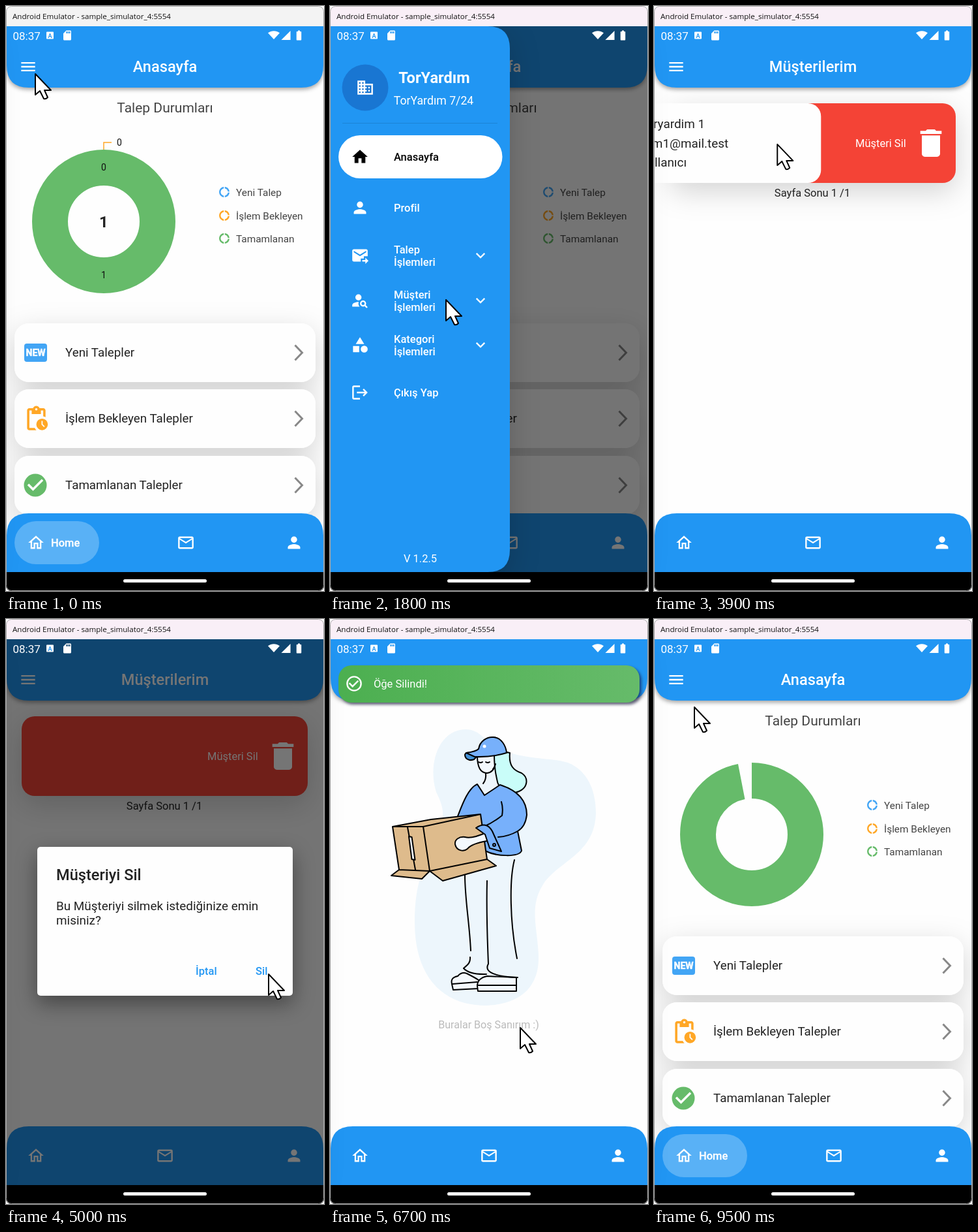
An HTML page for the animation above (9600 ms loop, 488 by 896 pixels).

```html
<!DOCTYPE html>
<html lang="tr">
<head>
<meta charset="utf-8">
<title>Emulator</title>
<style>
html, body { margin: 0; width: 100%; height: 100%; overflow: hidden; background: #fff; }
svg { display: block; font-family: Roboto, sans-serif; }
.soft { filter: drop-shadow(0 13px 22px rgba(0,0,0,.17)); }
.head { filter: drop-shadow(0 3px 3px rgba(0,0,0,.35)); }
.ink { stroke: #000; stroke-width: 2; stroke-linejoin: round; stroke-linecap: round; }
</style>
</head>
<body>
<svg id="stage" width="488" height="896" viewBox="0 0 488 896"></svg>
<script>
const BLUE = '#2196f3', GREEN = '#66bb6a', ORANGE = '#ffa726', SKY = '#42a5f5', DARK = '#222';
const CHECK = 'M16.59 7.58L10 14.17l-3.59-3.58L5 12l5 5 8-8zM12 2a10 10 0 1 0 0 20a10 10 0 0 0 0-20zm0 18a8 8 0 1 1 0-16a8 8 0 0 1 0 16z';
const ICONS = {
  menu: 'M3 18h18v-2H3v2zm0-5h18v-2H3v2zm0-7v2h18V6H3z',
  homeLine: 'M12 5.69l5 4.5V18h-2v-6H9v6H7v-7.81l5-4.5M12 3L2 12h3v8h6v-6h2v6h6v-8h3L12 3z',
  home: 'M10 20v-6h4v6h5v-8h3L12 3 2 12h3v8z',
  mail: 'M22 6c0-1.1-.9-2-2-2H4c-1.1 0-2 .9-2 2v12c0 1.1.9 2 2 2h16c1.1 0 2-.9 2-2V6zm-2 0l-8 5-8-5h16zm0 12H4V8l8 5 8-5v10z',
  send: 'M20 4H4c-1.1 0-2 .9-2 2v12c0 1.1.9 2 2 2h9v-4h4v-3h5V6c0-1.1-.9-2-2-2zm0 4l-8 5-8-5V6l8 5 8-5v2zM19 15l4 4-4 4v-3h-4v-2h4z',
  person: 'M12 12c2.21 0 4-1.79 4-4s-1.79-4-4-4-4 1.79-4 4 1.79 4 4 4zm0 2c-2.67 0-8 1.34-8 4v2h16v-2c0-2.66-5.33-4-8-4z',
  personLine: 'M12 5.9a2.1 2.1 0 1 1 0 4.2a2.1 2.1 0 0 1 0-4.2m0 9c2.97 0 6.1 1.46 6.1 2.1v1.1H5.9V17c0-.64 3.13-2.1 6.1-2.1M12 4a4 4 0 1 0 0 8a4 4 0 0 0 0-8zm0 9c-2.67 0-8 1.34-8 4v3h16v-3c0-2.66-5.33-4-8-4z',
  personSearch: 'M10 4a4 4 0 1 0 0 8a4 4 0 0 0 0-8zM10.35 14.01C7.62 13.91 2 15.27 2 18v2h9.54c-2.47-2.76-1.23-5.89-1.19-5.99zM19.43 18.02c.36-.59.57-1.28.57-2.02a4 4 0 1 0-4 4c.74 0 1.43-.22 2.02-.57L20.59 22 22 20.59zM16 18a2 2 0 1 1 0-4a2 2 0 0 1 0 4z',
  category: 'M12 2l-5.5 9h11zM17.5 13a4.5 4.5 0 1 0 0 9a4.5 4.5 0 0 0 0-9zM3 13.5h8v8H3z',
  logout: 'M17 7l-1.41 1.41L18.17 11H8v2h10.17l-2.58 2.58L17 17l5-5zM4 5h8V3H4c-1.1 0-2 .9-2 2v14c0 1.1.9 2 2 2h8v-2H4V5z',
  more: 'M16.59 8.59L12 13.17 7.41 8.59 6 10l6 6 6-6z',
  office: 'M12 7V3H2v18h20V7H12zM6 19H4v-2h2v2zm0-4H4v-2h2v2zm0-4H4V9h2v2zm0-4H4V5h2v2zm4 12H8v-2h2v2zm0-4H8v-2h2v2zm0-4H8V9h2v2zm0-4H8V5h2v2zm10 12h-8v-2h2v-2h-2v-2h2v-2h-2V9h8v10zm-2-8h-2v2h2v-2zm0 4h-2v2h2v-2z',
  pending: 'M17 12a5 5 0 1 0 0 10a5 5 0 0 0 0-10zm1.65 7.35L16.5 17.2V14h1v2.79l1.85 1.85-.7.71zM18 3h-3.18C14.4 1.84 13.3 1 12 1s-2.4.84-2.82 2H6c-1.1 0-2 .9-2 2v15c0 1.1.9 2 2 2h6.11c-.59-.57-1.07-1.25-1.42-2H6V5h2v3h8V5h2v5.08c.71.1 1.38.31 2 .6V5c0-1.1-.9-2-2-2zm-6 2a1 1 0 1 1 0-2a1 1 0 0 1 0 2z',
  done: 'M12 2a10 10 0 1 0 0 20a10 10 0 0 0 0-20zm-2 15l-5-5 1.41-1.41L10 14.17l7.59-7.59L19 8l-9 9z',
  check: CHECK,
  trash: 'M6 19c0 1.1.9 2 2 2h8c1.1 0 2-.9 2-2V7H6v12zM19 4h-3.5l-1-1h-5l-1 1H5v2h14V4z',
  donut: 'M11 5.08V2c-5 .5-9 4.81-9 10s4 9.5 9 10v-3.08c-3-.48-6-3.4-6-6.92s3-6.44 6-6.92zM18.97 11H22c-.47-5-4-8.53-9-9v3.08C16 5.51 18.54 8 18.97 11zM13 18.92V22c5-.47 8.53-4 9-9h-3.03c-.43 3-2.97 5.49-5.97 5.92z',
  wifi: 'M12 20L0 7C7 1.500 17 1.500 24 7z',
  signal: 'M2 22h20V2z',
  battery: 'M15.7 4H14V2h-4v2H8.300C7.600 4 7 4.600 7 5.300v15.400c0 .7.6 1.300 1.300 1.300h7.400c.7 0 1.300-.6 1.300-1.300V5.300C17 4.600 16.400 4 15.700 4z',
  sd: 'M18 2h-8L4 8v12c0 1.100.9 2 2 2h12c1.100 0 2-.9 2-2V4c0-1.100-.9-2-2-2zm-6 6h-2V4h2v4zm3 0h-2V4h2v4zm3 0h-2V4h2v4z'
};

const text = (x, y, size, str, fill = DARK, more = '') =>
  `<text x="${x}" y="${y}" font-size="${size}" fill="${fill}" ${more}>${str}</text>`;
const MID = 'text-anchor="middle"', MEDIUM = 'font-weight="500"', BOLD = 'font-weight="700"';
const icon = (name, x, y, fill = '#fff', size = 28.4, id = '') =>
  `<g transform="translate(${x} ${y})"><path ${id && `id="${id}"`} d="${ICONS[name]}" fill="${fill}" transform="scale(${size / 24}) translate(-12 -12)"/></g>`;
const rect = (x, y, w, h, r, fill, more = '') =>
  `<rect x="${x}" y="${y}" width="${w}" height="${h}" rx="${r}" fill="${fill}" ${more}/>`;
const ink = (d, fill = 'none', id = '') => `<path class="ink" ${id && `id="${id}"`} d="${d}" fill="${fill}"/>`;
const group = (id, body, more = '') => `<g id="${id}" ${more}>${body}</g>`;

const legend = (y, color, label) => icon('donut', 335, y, color, 19) + text(353, y + 6, 15.4, label, '#444');
const homeCard = (y, label, art) => rect(13, y, 462, 90, 22, '#fefefe') + art +
  text(91, y + 51, 18.8, label) +
  `<path d="M443.500 ${y + 33.5}l11 11.500-11 11.500" fill="none" stroke="#888" stroke-width="3"/>`;

const home = rect(1, 31, 486, 836, 0, '#fefefe') +
  text(244, 163, 21, 'Talep Durumları', '#444', MID) +
  `<circle id="ring" cx="150" cy="330" r="82.500" fill="none" stroke="${GREEN}" stroke-width="55" pathLength="100" transform="rotate(-90 150 330)"/>` +
  group('labels', `<path d="M150 220v-11h12" fill="none" stroke="${ORANGE}" stroke-width="1.500"/>` +
    [[174, 214, 0], [150, 252, 0], [150, 417, 1]].map(([x, y, n]) => text(x, y, 14, n, '#111', MID)).join('') +
    text(150, 339, 24, 1, DARK, MID + BOLD)) +
  legend(285, SKY, 'Yeni Talep') + legend(321, ORANGE, 'İşlem Bekleyen') + legend(356, GREEN, 'Tamamlanan') +
  `<g class="soft">${[486, 587, 689].map(y => rect(13, y, 462, 90, 22, '#fefefe')).join('')}</g>` +
  homeCard(486, 'Yeni Talepler', rect(28, 517, 35, 28, 4, SKY) +
    text(45.5, 536, 14, 'NEW', '#fff', MID + BOLD + ' stroke="#fff" stroke-width=".5"')) +
  homeCard(587, 'İşlem Bekleyen Talepler', icon('pending', 46.5, 632, ORANGE, 42.500)) +
  homeCard(689, 'Tamamlanan Talepler', icon('done', 45, 734, GREEN, 42));

const info = (y, name, key, value) => icon(name, 51, y, '#4caf50') +
  text(75, y + 7, 18.9, `<tspan ${BOLD}>${key}</tspan> ${value}`);
const list = rect(24, 149, 439, 122, 20, '#f44336', 'id="backing" class="soft"') +
  group('deleteHint', text(309, 216, 16.5, 'Müşteri Sil', '#fff') + icon('trash', 425, 210, '#fff', 56)) +
  group('card', rect(24, 149, 439, 122, 20, '#fefefe') +
    info(180, 'personLine', 'Kullanıcı adı:', 'toryardim 1') +
    info(210, 'mail', 'E-Mail:', 'toryardim1@mail.test') +
    info(239, 'check', 'Durum:', 'Aktif Kullanıcı')) +
  text(243, 292, 16.5, 'Sayfa Sonu 1 /1', DARK, MID);

const CLOTH = '#77b0fb', CARTON = '#debb8c', PALE = '#f4f9fd';
const empty = `<path fill="#edf6fc" d="M208 169C232 169 238 190 262 200C300 216 340 212 365 220C395 232 408 262 408 298C406 360 352 370 328 405C305 440 318 470 320 515C322 565 290 592 235 592C170 590 130 545 130 465C130 400 145 380 160 345C182 300 172 285 163 265C150 225 165 170 208 169Z"/>` +
  ink('M207 392C207 430 214 465 216 508M241 401C240 440 241 480 243 528M283 369C275 400 276 465 287 520') +
  ink('M187 559C185 551 190 548 196 547Q202 540 210 543Q222 549 228 553V566L189 568Z', PALE) +
  ink('M226 562C226 553 232 549 241 547L286 549V570H227Z', PALE) +
  ink('M188 559L226 556M226 561H286M215 518C216 528 209 531 205 535Q214 545 240 544M243 528C238 537 242 547 288 549') +
  group('head', ink('M226 209C226 222 229 236 241 236Q251 235 254 222L253 208', PALE) +
    ink('M252 207Q264 202 276 205C274 225 282 232 294 236C305 243 304 258 290 264C275 271 258 262 256 245Q252 228 252 207Z', '#c9fdf9') +
    ink('M228 219q3 2 6 0M239 219q3 2 6 0M254 222q-1 5-4 8') +
    ink('M207 208Q208 204 214 205L225 210Q222 217 214 216Q207 214 207 208Z', '#4391d6') +
    ink('M209 205Q224 203 228 199C230 187 241 180 251 181C263 182 270 194 271 205Q248 212 222 211Z', CLOTH) +
    '<circle cx="237" cy="195" r="2.500" fill="#fff"/>') +
  ink('M239 236Q240 246 235 252') +
  ink('M226 253L237 270L261 254C286 262 302 277 302 300Q300 318 288 325L294 355C290 365 255 364 238 355L196 302C203 284 212 259 226 253Z', CLOTH) +
  ink('M263 280Q266 290 264 301Q250 312 236 318M288 325Q274 333 258 334') +
  ink('', CARTON, 'box') + ink('', PALE, 'slot') +
  ink('M240 327Q218 337 207 334C198 333 191 338 192 345C194 355 205 357 211 352Q217 344 241 340Z', PALE) +
  ink('M224 320Q240 309 249 325L263 356L245 351L238 330Z', CLOTH) +
  '<circle class="ink" cx="252" cy="346" r="2" fill="none"/>' +
  text(243.5, 627, 16.1, 'Buralar Boş Sanırım :)', '#bbb', MID);

const nav = `<path fill="${BLUE}" d="M1 867V811Q1 777 35 777H453Q487 777 487 811V867Z"/>` +
  rect(13, 789, 130, 66, 33, '#fff', 'id="pill"') + icon('homeLine', 46, 822) +
  text(69, 828, 16.5, 'Home', '#fff', MEDIUM + ' id="homeLabel" stroke="#fff" stroke-width=".3"') +
  group('mail', icon('mail', 244, 822)) + icon('person', 442, 822);

const item = (y, name, lines, fill = '#fff') => icon(name, 46, y, fill) +
  lines.map((s, i) => text(98, y + 6 + (i - (lines.length - 1) / 2) * 19, 16.5, s, fill, MEDIUM)).join('');
const drawer = `<path fill="${BLUE}" class="soft" d="M1 31H242Q276 31 276 65V833Q276 867 242 867H1Z"/>` +
  '<circle cx="54" cy="125" r="35.500" fill="#1976d2"/>' + icon('office', 54, 125) +
  text(160, 118, 23.6, 'TorYardım', '#fff', MID + BOLD) + text(159, 151, 17.7, 'TorYardım 7/24', '#fff', MID) +
  rect(19, 179, 238, 1, 0, '#1c84d6') + rect(13, 198, 251.500, 66, 33, '#fff') +
  item(231, 'home', ['Anasayfa'], '#000') + item(309, 'person', ['Profil']) +
  item(382, 'send', ['Talep', 'İşlemleri']) + icon('more', 231, 382) +
  item(451, 'personSearch', ['Müşteri', 'İşlemleri']) + group('arrow', icon('more', 231, 451)) +
  group('child', text(98, 525, 16.5, 'Müşterilerim', '#fff', MEDIUM)) +
  group('below', item(519, 'category', ['Kategori', 'İşlemleri']) + icon('more', 231, 519) + item(592, 'logout', ['Çıkış Yap'])) +
  text(138.5, 852, 16.5, 'V 1.2.5', '#fff', MID);

const dialog = rect(48, 349, 392, 228, 5, '#fefefe', 'style="filter:drop-shadow(0 12px 16px rgba(0,0,0,.4))"') +
  text(77, 400, 23.6, 'Müşteriyi Sil', DARK, MEDIUM) +
  text(77, 446, 18.9, 'Bu Müşteriyi silmek istediğinize emin') + text(77, 468, 18.9, 'misiniz?') +
  text(291, 545, 16.5, 'İptal', BLUE, MEDIUM) + text(383, 545, 16.5, 'Sil', BLUE, MEDIUM);

const toast = rect(13, 71, 462, 57, 20, 'url(#leaf)', 'style="filter:drop-shadow(3px 3px 2px rgba(20,20,60,.6))"') +
  icon('check', 37, 99) + text(67, 105, 16.5, 'Öğe Silindi!', '#fff');

const status = text(10.5, 52, 17, '08:37', '#fff') + rect(62, 39.500, 11, 11, 1, '#fff') +
  text(67.5, 49, 9, 'A', BLUE, MID + BOLD) + icon('sd', 94, 45, '#fff', 18) +
  icon('wifi', 411, 45, '#fff', 18) + icon('signal', 429.5, 45, '#fff', 17) + icon('battery', 449.5, 45, '#fff', 18);

stage.innerHTML = `<defs>
  <clipPath id="app"><rect x="1" y="31" width="486" height="836"/></clipPath>
  <clipPath id="window"><rect width="488" height="896" rx="8"/></clipPath>
  <linearGradient id="leaf"><stop stop-color="#4caf50"/><stop offset="1" stop-color="${GREEN}"/></linearGradient></defs>
  <g clip-path="url(#window)">` + rect(0, 0, 488, 31, 0, '#f3f3f3', 'id="bar"') +
  text(10, 20, 11.6, 'Android Emulator - sample_simulator_4:5554', '#111', 'font-family="Open Sans, sans-serif"') +
  '<g clip-path="url(#app)">' + home +
  group('customers', rect(1, 31, 486, 836, 0, '#fefefe') + group('list', list) + group('empty', empty)) +
  `<path class="head" fill="${BLUE}" d="M1 20H487V91Q487 125 453 125H35Q1 125 1 91Z"/>` + icon('menu', 34, 93) +
  text(244, 101, 23.6, 'Anasayfa', '#fff', MID + MEDIUM + ' id="homeTitle"') +
  text(244, 101, 23.6, 'Müşterilerim', '#fff', MID + MEDIUM + ' id="listTitle"') +
  nav + rect(1, 31, 486, 836, 0, '#000', 'id="scrim"') +
  group('drawer', drawer) + group('dialog', dialog) + group('toast', toast) + status + '</g>' +
  rect(0, 867, 488, 29, 0, '#000') + rect(180, 878, 128, 5, 2.5, '#fff') +
  rect(.5, .5, 487, 895, 8, 'none', 'stroke="#aaa"') +
  ink('M1 1V33L8 27L14 39Q17 40 20 37L15 26H25Z', '#fff', 'cursor') + '</g>';

const $ = id => document.getElementById(id);
const set = (id, name, value) => $(id).setAttribute(name, value);
const move = (id, x, y) => set(id, 'transform', `translate(${x} ${y})`);
const clamp = v => Math.min(1, Math.max(0, v));
const ramp = (t, from, to) => clamp((t - from) / (to - from));
const out = p => 1 - (1 - p) ** 3;
const mix = (a, b, p) => a + (b - a) * p;

// time, x, y of the pointer tip
const POINTER = [[0, 44, 103], [400, 44, 103], [1000, 155, 503], [1100, 158, 496], [1200, 158, 496],
  [1700, 177, 449], [1900, 177, 449], [2200, 168, 510], [2400, 168, 523], [2700, 168, 524], [3200, 328, 237],
  [3400, 395, 205], [3600, 395, 205], [4000, 150, 212], [4100, 150, 212], [4500, 370, 541], [4700, 402, 543],
  [5400, 402, 543], [6700, 291, 625], [6900, 255, 680], [7900, 104, 757], [8400, 46, 814], [8700, 46, 814], [9500, 61, 134]];
function pointerAt(t) {
  const i = Math.max(1, POINTER.findIndex(k => k[0] >= t));
  const [t0, x0, y0] = POINTER[i - 1], [t1, x1, y1] = POINTER[i];
  const p = ramp(t, t0, t1), s = p * p * (3 - 2 * p);
  return [mix(x0, x1, s), mix(y0, y1, s)];
}

function drawBox(k) {
  const y = -9 * k, at = (ax, ay, bx, by) => `${mix(ax, bx, k)} ${mix(ay, by, k)}`;
  const low = at(153, 386, 156, 377), far = at(241, 368, 240, 361), side = at(106, 384, 108, 374);
  set('box', 'd', `M96 ${318 + y}L155 ${307 + y}L231 ${299 + y}L143 ${318 + y}Z
    M143 ${318 + y}L231 ${299 + y}L${far}L${low}ZM96 ${318 + y}L143 ${318 + y}L${low}L${side}Z
    M${low}L${far}L${at(255, 378, 247, 380)}L${at(173, 401, 162, 404)}Z
    M${side}L${low}L${at(141, 398, 155, 405)}L${at(94, 393, 107, 395)}ZM119 ${319 + y}L131 ${384 + y}`);
  set('slot', 'd', `M121 ${333 + y}l4.500 1l5 35l-5-1Z`);
}

function draw(t) {
  set('bar', 'fill', t < 200 ? '#f3f3f3' : '#f9eff7');
  const listPage = ramp(t, 2800, 3000) * (1 - ramp(t, 8650, 8850));
  set('customers', 'opacity', listPage);
  set('listTitle', 'opacity', listPage);
  set('homeTitle', 'opacity', 1 - listPage);

  const left = 1 - ramp(t, 8840, 9640);
  const sweep = t < 5000 ? 1 : 1 - left * left;
  set('ring', 'stroke-dasharray', `${sweep * 100} ${sweep < 1 ? 200 : 0}`);
  set('labels', 'opacity', sweep < 1 ? 0 : 1);

  const tab = t < 5000 ? 1 - out(ramp(t, 2800, 3100)) : out(ramp(t, 8700, 9200));
  set('pill', 'width', 66 + 64 * tab);
  set('pill', 'opacity', .25 * tab);
  set('homeLabel', 'opacity', tab);
  move('mail', 32 * tab, 0);

  const open = out(ramp(t, 200, 500)) * (1 - out(ramp(t, 2750, 3000)));
  move('drawer', -300 * (1 - open), 0);
  const grow = out(ramp(t, 1850, 2100));
  move('below', 0, 66 * grow);
  set('child', 'opacity', grow);
  set('arrow', 'transform', `rotate(${180 * grow} 231 451)`);

  const ask = ramp(t, 4250, 4450) * (1 - ramp(t, 5150, 5300));
  set('dialog', 'opacity', ask);
  set('scrim', 'opacity', .54 * Math.max(open, ask));

  const swiping = t > 3600;
  set('backing', 'fill', swiping ? '#f44336' : '#fefefe');
  set('deleteHint', 'opacity', swiping ? 1 : 0);
  const drag = ramp(t, 3600, 4000);
  move('card', -245 * drag * drag * (3 - 2 * drag) - 245 * ramp(t, 4050, 4250), 0);
  const gone = ramp(t, 5350, 5500);
  set('list', 'opacity', 1 - gone);
  set('empty', 'opacity', gone);
  move('toast', 0, -110 * (1 - out(ramp(t, 5450, 5950)) + out(ramp(t, 7100, 7600))));

  const lift = .5 - .5 * Math.cos((t - 6700) / 1200 * Math.PI);
  drawBox(lift);
  move('head', 1.5 * lift, -.5 * lift);
  move('cursor', ...pointerAt(t));
}

function tick() {
  draw(Math.floor(performance.now() % 9600 / 100) * 100);
  requestAnimationFrame(tick);
}
tick();
</script>
</body>
</html>
```
